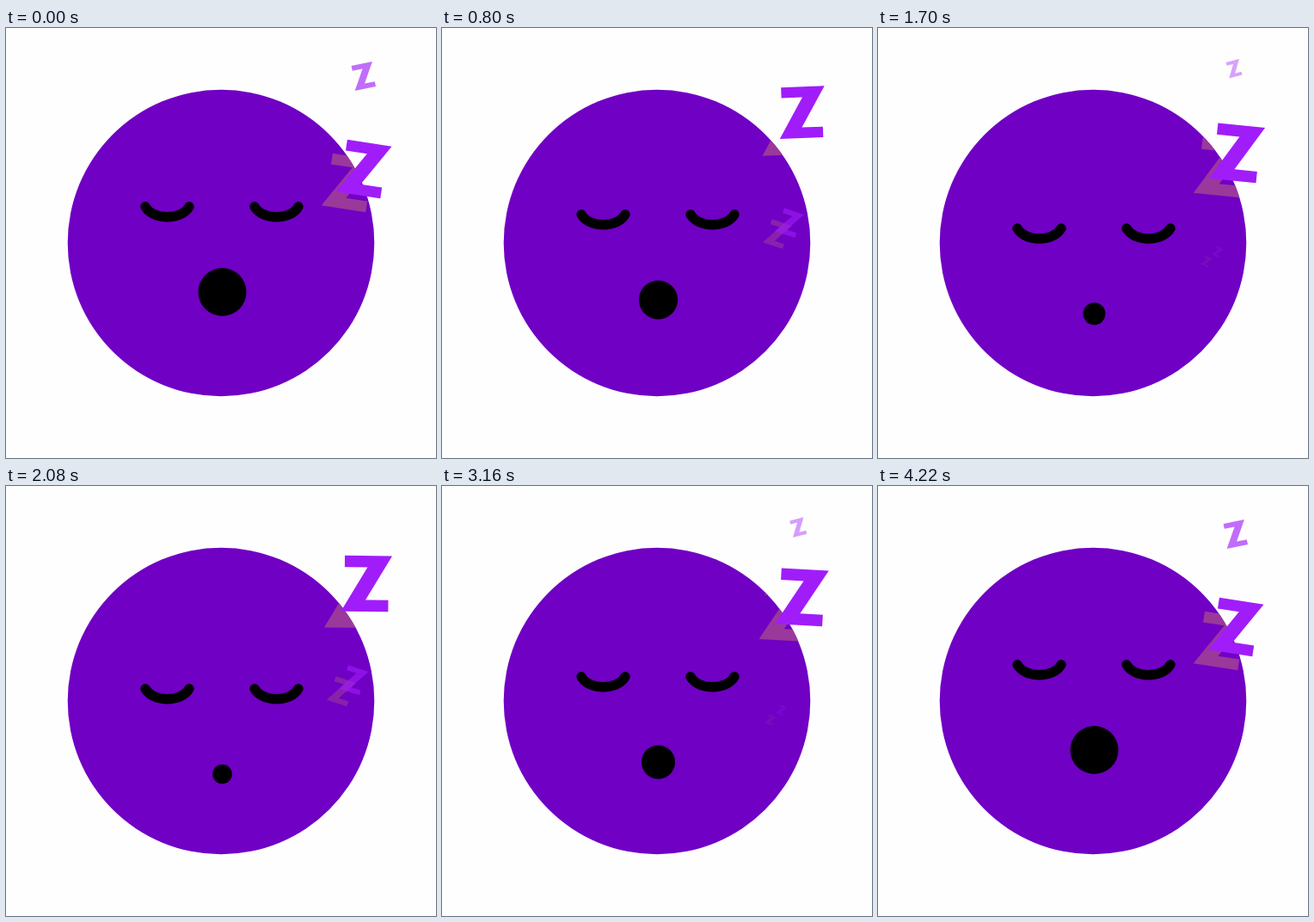
Write an HTML page with a canvas that moves like this. It is 500 px wide and 500 px high and loops after 4.24 s.

```html
<!DOCTYPE html>
<html lang="en">
<head>
<meta charset="utf-8">
<title>Sleeping face</title>
<style>
  html, body { margin: 0; width: 100%; height: 100%; overflow: hidden; background: #fefefe; }
  canvas { display: block; width: 500px; height: 500px; }
</style>
</head>
<body>
<canvas id="stage" width="500" height="500"></canvas>
<script>
const ctx = document.getElementById('stage').getContext('2d');

const LOOP = 4240, STEP = 20, CYCLE = LOOP - STEP;
const FACE = '#7000c4', VIOLET = '#a01dfa', SHADE = '#9b389b';

// Each letter lives from BIRTH to DEATH around its own zero time.
const BIRTH = -1284, DEATH = 2110;
const ZEROS = [0, 1483, 2754];

// [time, x, y] along the drift of a letter
const PATH = [
  [-1284, 389, 281], [-600, 406, 219.1], [-163, 414.4, 179.2], [0, 416.1, 164],
  [597, 419.2, 113.6], [866, 418.5, 93.4], [1217, 417.4, 70], [1466, 415.8, 56],
  [2110, 411, 33.5]
];

// Letter outline at full size, centred; the second half mirrors the first.
const HALF = [[-25.5, -32.5], [29.5, -32.5], [-1, 19], [25.5, 19]];
const LETTER = HALF.concat(HALF.map(([x, y]) => [-x, -y]));

const clamp = v => Math.max(0, Math.min(1, v));
const ramp = (v, from, to) => clamp((v - from) / (to - from));

function slope(i, k) {
  const a = PATH[Math.max(i - 1, 0)], b = PATH[Math.min(i + 1, PATH.length - 1)];
  return (b[k] - a[k]) / (b[0] - a[0]);
}

function along(u, k) {
  let i = 0;
  while (i < PATH.length - 2 && u > PATH[i + 1][0]) i++;
  const a = PATH[i], b = PATH[i + 1], h = b[0] - a[0];
  const s = (u - a[0]) / h, s2 = s * s, s3 = s2 * s;
  return (2 * s3 - 3 * s2 + 1) * a[k] + (s3 - 2 * s2 + s) * h * slope(i, k)
       + (3 * s2 - 2 * s3) * b[k] + (s3 - s2) * h * slope(i + 1, k);
}

function disc(x, y, r, color) {
  ctx.beginPath();
  ctx.arc(x, y, r, 0, Math.PI * 2);
  ctx.fillStyle = color;
  ctx.fill();
}

function letter(x, y, size, angle, color) {
  ctx.save();
  ctx.translate(x, y);
  ctx.rotate(angle);
  ctx.scale(size, size);
  ctx.beginPath();
  LETTER.forEach(p => ctx.lineTo(p[0], p[1]));
  ctx.closePath();
  ctx.fillStyle = color;
  ctx.fill();
  ctx.restore();
}

function drift(u) {
  const x = along(u, 1), y = along(u, 2);
  const size = Math.min(ramp(u, BIRTH, 68), ramp(u, DEATH, 686));
  const angle = (8.9 - 0.0139 * u) * Math.PI / 180;

  ctx.globalAlpha = Math.min(ramp(u, BIRTH, -266), ramp(u, DEATH, 1100));

  // The shadow falls on the face only.
  ctx.save();
  ctx.beginPath();
  ctx.arc(250, 250, 178.3, 0, Math.PI * 2);
  ctx.clip();
  letter(x - 17 - 0.004 * u, y + 16 + 0.0045 * u, size, angle, SHADE);
  ctx.restore();

  letter(x, y, size, angle, VIOLET);
  ctx.globalAlpha = 1;
}

function eye(x, y) {
  ctx.beginPath();
  ctx.moveTo(x, y);
  ctx.bezierCurveTo(x + 9, y + 16, x + 42, y + 16, x + 51, y);
  ctx.stroke();
}

function draw(t) {
  ctx.fillStyle = '#fefefe';
  ctx.fillRect(0, 0, 500, 500);
  disc(250, 250, 178.3, FACE);

  const p = 1 - Math.abs(1 - 2 * t / CYCLE);
  const breath = p * p * (3 - 2 * p);
  const drop = 28 * breath;

  ctx.lineWidth = 11.5;
  ctx.lineCap = 'round';
  ctx.strokeStyle = '#000';
  eye(162, 207.7 + drop);
  eye(289, 207.7 + drop);
  disc(251.5, 307 + drop, 28 - 16.7 * breath, '#000');

  for (const zero of ZEROS) {
    let u = t - zero;
    while (u < BIRTH) u += CYCLE;
    while (u >= BIRTH + CYCLE) u -= CYCLE;
    if (u < DEATH) drift(u);
  }
}

function tick(now) {
  const t = Math.floor((now % LOOP) / STEP) * STEP;
  draw(t % CYCLE);
  requestAnimationFrame(tick);
}

draw(0);
requestAnimationFrame(tick);
</script>
</body>
</html>
```
